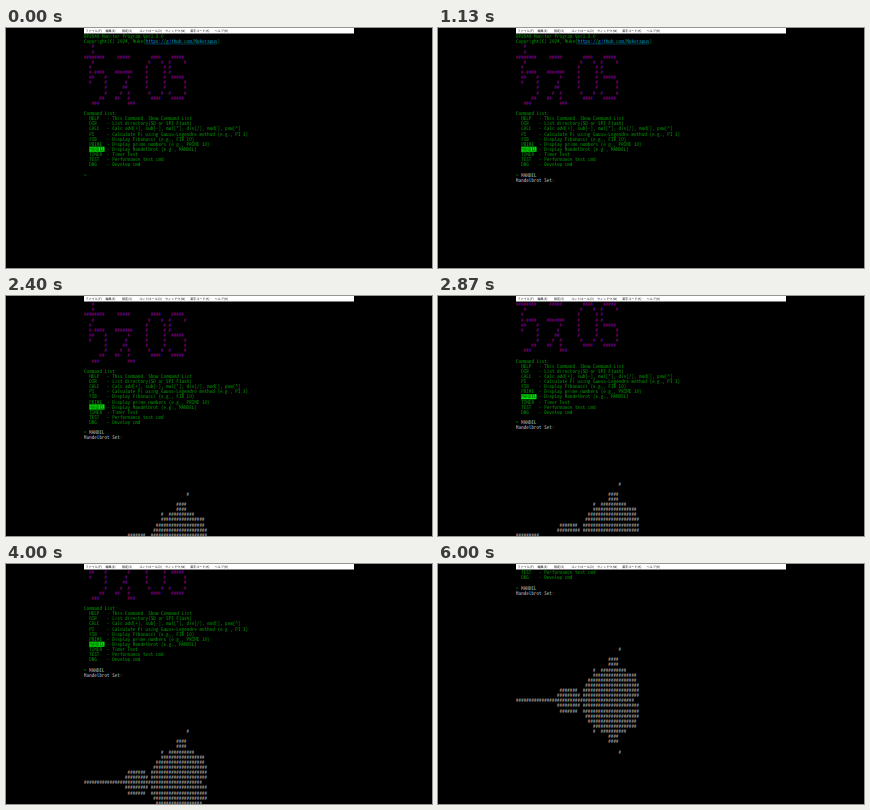
An HTML page with a canvas that plays this animation: 426x240 px, repeating every 6070 ms.

```html
<!DOCTYPE html>
<html lang="ja">
<head>
<meta charset="utf-8">
<title>Mandelbrot in a terminal</title>
<style>
html, body { margin: 0; width: 100%; height: 100%; overflow: hidden; background: #000; }
canvas { display: block; width: 426px; height: 240px; }
</style>
</head>
<body>
<canvas id="stage" width="426" height="240"></canvas>
<script>
const ctx = document.getElementById('stage').getContext('2d');
const LOOP = 6070, FRAME = 1000 / 15;
const LEFT = 78, RIGHT = 348, TOP = 5.9, CW = 2.565, LH = 5.125, BASE = 4.25;
const LAST_LINE = 45, SET_LINE = 29;
const GREEN = [0, 150, 0], MAGENTA = [150, 0, 165], GRAY = [195, 195, 195], LINK = [0, 150, 195];

const banner = [
  '   #',
  '   #',
  '########     #####        ####    #####',
  '   #                     #    #  #     #',
  '  #                     #      # #',
  '  # ####    #######     #      # #',
  '  ##    #        #      #      #  #####',
  '  #     #       #       #      #       #',
  '        #      ##       #      #       #',
  '        #     #  #       #    #  #     #',
  '      ##    ##   #        ####    #####',
  '   ###           ###'
];
const commands = [
  ['HELP', 'This Command. Show Command List'],
  ['DIR', 'List directory(SD or SPI Flash)'],
  ['CALC', 'Calc add[+], sub[-], mul[*], div[/], mod[], pow[^]'],
  ['PI', 'Calculate Pi using Gauss-Legendre method (e.g., PI 3)'],
  ['FIB', 'Display Fibonacci (e.g., FIB 10)'],
  ['PRIME', 'Display prime numbers (e.g., PRIME 10)'],
  ['MANDEL', 'Display Mandelbrot (e.g., MANDEL)'],
  ['TIMER', 'Timer Test'],
  ['TEST', 'Performance test cmd'],
  ['DBG', 'Develop cmd']
];
const menu = [
  [79.5, 'ファイル(F)'], [99.5, '編集(E)'], [116, '設定(S)'], [133, 'コントロール(O)'],
  [159, 'ウィンドウ(W)'], [184, '漢字コード(K)'], [208.5, 'ヘルプ(H)']
];

// Size the monospace font so that one character fills one cell
const FACE = '"Noto Sans Mono CJK JP", "DejaVu Sans Mono", monospace';
ctx.font = `100px ${FACE}`;
const termFont = `${(100 * CW / ctx.measureText('0').width).toFixed(2)}px ${FACE}`;

// Mandelbrot grid: real -2..1 in steps of 0.05, imaginary -2..2 in steps of 0.1
const COLS = 60, ROWS = 41;
function inSet(a, b) {
  let x = 0, y = 0;
  for (let i = 0; i < 200; i++) {
    [x, y] = [x * x - y * y + a, 2 * x * y + b];
    if (x * x + y * y > 4) return false;
  }
  return true;
}

// Points inside the set take far longer to print
const cells = [], rowWork = [0];
let total = 0;
for (let r = 0; r < ROWS; r++) {
  for (let c = 0; c < COLS; c++) {
    const hit = inSet((c - 40) / 20, (r - 20) / 10);
    total += hit ? 1 : 0.04;
    if (hit) cells.push({ r, c, at: total });
  }
  rowWork.push(total);
}

// [ms, rows finished]
const pace = [[725, 0], [1140, 10], [2404, 19], [3271, 21], [4004, 25], [4530, 41]];
function workAt(t) {
  for (let i = 1; i < pace.length; i++) {
    const [t0, r0] = pace[i - 1], [t1, r1] = pace[i];
    if (t < t1) {
      const p = Math.max(0, (t - t0) / (t1 - t0));
      return rowWork[r0] + p * (rowWork[r1] - rowWork[r0]);
    }
  }
  return total;
}

let scroll = 0;
const lineTop = line => TOP + (line - scroll) * LH;

// Each colour channel is shifted a little, like subpixel smoothing
function put(text, col, line, color) {
  const row = line - scroll;
  if (row < 0 || row > LAST_LINE) return;
  const y = lineTop(line) + BASE;
  ctx.globalCompositeOperation = 'lighter';
  color.forEach((v, i) => {
    if (!v) return;
    ctx.fillStyle = `rgb(${color.map((_, j) => j === i ? v : 0)})`;
    [...text].forEach((ch, k) => {
      if (ch !== ' ') ctx.fillText(ch, LEFT + (col + k) * CW + (i - 1) * 0.3, y);
    });
  });
  ctx.globalCompositeOperation = 'source-over';
}

function drawHeader() {
  put('RP2040 Monitor Program Ver1.0.0', 0, 0, GREEN);
  const owner = 'Copyright(C) 2024, Muke(', url = 'https://github.com/Mukerapus';
  put(owner, 0, 1, GREEN);
  put(url, owner.length, 1, LINK);
  put(')', owner.length + url.length, 1, GREEN);
  if (scroll < 2) {
    ctx.fillStyle = 'rgb(0,120,155)';
    ctx.fillRect(LEFT + owner.length * CW, lineTop(1) + 4.7, url.length * CW, 0.5);
  }
  banner.forEach((s, i) => put(s, 0, i + 2, MAGENTA));
}

function drawCommands() {
  put('Command List:', 0, 15, GREEN);
  commands.forEach(([name, about], i) => {
    const line = 16 + i;
    put('- ' + about, 9, line, GREEN);
    if (name !== 'MANDEL') {
      put(name, 2, line, GREEN);
    } else if (line >= scroll) {
      const x = LEFT + 2 * CW, y = lineTop(line);
      ctx.fillStyle = '#00e600';
      ctx.fillRect(x, y, 6 * CW, LH);
      ctx.fillStyle = '#005000';
      [...name].forEach((ch, k) => ctx.fillText(ch, x + k * CW, y + BASE));
    }
  });
}

function drawMenu() {
  ctx.fillStyle = '#fff';
  ctx.fillRect(LEFT, 0, RIGHT - LEFT, 5.5);
  ctx.fillStyle = '#111';
  ctx.font = '3.1px "Noto Sans CJK JP", "Noto Sans CJK", sans-serif';
  menu.forEach(([x, s]) => ctx.fillText(s, x, 4));
}

function draw(t) {
  const work = workAt(t);
  let row = 0;
  while (row < ROWS - 1 && rowWork[row + 1] <= work) row++;
  scroll = Math.max(0, SET_LINE + row - LAST_LINE);

  ctx.fillStyle = '#000';
  ctx.fillRect(0, 0, 426, 240);
  ctx.textRendering = 'geometricPrecision';
  ctx.font = termFont;
  drawHeader();
  drawCommands();

  const typed = Math.max(0, Math.min(6, Math.floor((t - 30) / 100)));
  put('>', 0, 27, GREEN);
  put('MANDEL'.slice(0, typed), 2, 27, GRAY);
  if (t >= 725) put('Mandelbrot Set:', 0, 28, GRAY);
  for (const { r, c, at } of cells) {
    if (at <= work) put('#', c, SET_LINE + r, GRAY);
  }
  drawMenu();
}

const start = performance.now();
let shown = -1;
function tick() {
  const t = Math.max(0, performance.now() - start) % LOOP;
  const step = Math.floor((t + 3.4) / FRAME);
  if (step !== shown) draw((shown = step) * FRAME);
  requestAnimationFrame(tick);
}
tick();
</script>
</body>
</html>
```
